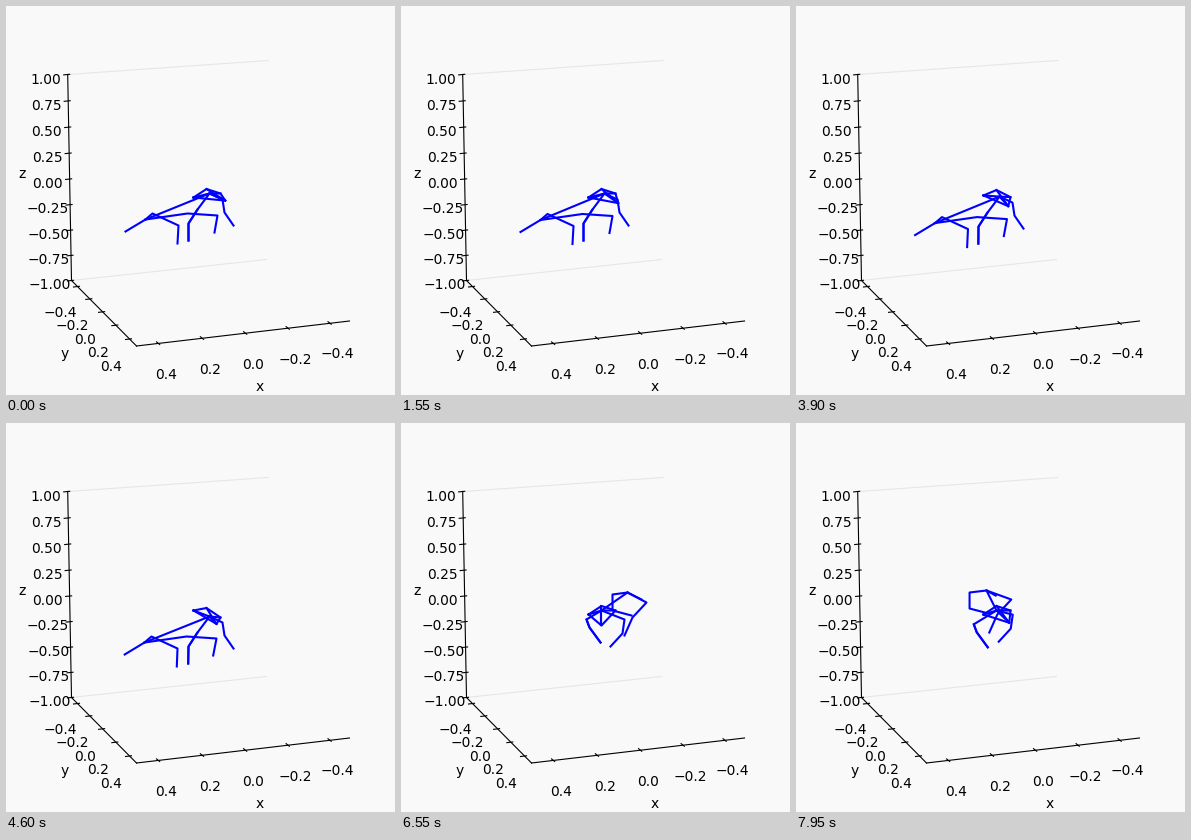
Animation, 389 px wide and 389 px high, one loop 8000 ms. Source, as a matplotlib script:

```python
import numpy as np
import matplotlib.pyplot as plt
from matplotlib.animation import FuncAnimation

SIZE, STEP, LOOP = 389, 50, 8000
WALK_END, TURN, AWAY = 5100, 5750, 6550

# Limbs as joint offsets: walking pose, turned-away pose, then how the limb
# spreads in the turn (first joint, extra per joint) and drifts at the end.
REAR = {
    "a": ([(-9, 16), (-18, 30), (-18, 47)], [(-15, 9), (-12, 17), (-1, 32)],
          (0, 0), (-3, 4), (-8, 5)),
    "b": ([(16, 6), (18, 19), (27, 32)], [(23, 9), (21, 23), (9, 36)],
          (0, -2), (13, 0), (-7, -5)),
}
FRONT = {
    "c": ([(7, -6), (33, 6), (32, 24)], [(19, 10), (5, 25), (-3, 43)],
          (3, 3), (12, -5), (6, -1)),
    "d": ([(42, -6), (72, -4), (69, 13)], [(-15, 2), (-15, 18), (4, 23)],
          (-25, -1), (-5, -1), (-2, 0)),
    "tip": ([(-20, 12)], [(14, 7)], (-2, 0), (0, 0), (-5, -2)),
}
STRIDE = {"a": 1.5, "c": -1.5, "d": 1.5, "tip": -1}

CHAINS = [c.split() for c in (
    "left top right low left", "left root right", "top low", "root low",
    "root chest tip0", "chest c0 c1 c2", "chest d0 d1 d2",
    "root a0 a1 a2", "a0 splay a2", "root b0 b1 b2")]


def ramp(t, start, end):
    return np.clip((t - start) / (end - start), 0, 1)


def ease(t, start, end):
    return 0.5 - 0.5 * np.cos(np.pi * ramp(t, start, end))


def chest_at(t):
    """Steady walk, swing out to the right, then drift back behind the hips."""
    times = [0, 3150, 4600, WALK_END, TURN, 6150, AWAY, 7200, 7950]
    x = [139, 139, 138, 138, 213, 255, 226, 208, 190]
    y = [213, 214, 219, 219, 186, 179, 169, 164, 167]
    return np.array([np.interp(t, times, x), np.interp(t, times, y)])


def pose(t):
    turned = ease(t, WALK_END, TURN)
    wide = np.sin(np.pi * ramp(t, WALK_END, 2 * TURN - WALK_END)) ** 2
    late = ramp(t, AWAY, LOOP)
    sink = ramp(t, 3150, 4600) - turned
    gait = np.sin(2 * np.pi * t / 1550) * (1 - turned)

    chest = chest_at(t)
    hips = np.array([200, 187 + 6 * sink])
    spin = np.radians(np.interp(t, [0, 4600, TURN, AWAY, LOOP], [20, 60, 117, 90, 49]))
    p = {"chest": chest,
         "root": hips + [3 * (1 - turned), 0],
         "left": np.array([187, 191 - 4 * sink]),
         "top": np.array([200, 182.5 + 2 * sink]),
         "right": np.array([214, 187 + 7 * sink]),
         "low": np.array([200 + 20 * np.cos(spin), 190 + 12 * np.sin(spin)])}

    for origin, limbs in ((hips, REAR), (chest, FRONT)):
        for name, (walk, away, base, step, drift) in limbs.items():
            n = np.arange(len(walk))[:, None]
            joints = (origin + (1 - turned) * np.array(walk) + turned * np.array(away)
                      + wide * (np.array(base) + n * np.array(step))
                      + late * np.array(drift))
            joints[-1, 0] += STRIDE.get(name, 0) * gait
            p.update({f"{name}{k}": joint for k, joint in enumerate(joints)})
    p["splay"] = p["a1"] + wide * np.array([11, -1])
    return p


fig = plt.figure(figsize=(SIZE / 100, SIZE / 100), dpi=100, facecolor="#f9f9f9")
ax = fig.add_axes([0, 0, 1, 1])
ax.set_xlim(-0.5, SIZE - 0.5)
ax.set_ylim(SIZE - 0.5, -0.5)
ax.axis("off")


def segment(a, b, color="black"):
    ax.plot([a[0], b[0]], [a[1], b[1]], color=color, lw=0.8)


def label(x, y, text):
    ax.text(x, y, text, fontsize=10, family="DejaVu Sans", ha="center", va="baseline")


def scale(values, fmt, ticks, texts, stub, bow):
    """Ticks and labels between two end positions; bow adds the perspective."""
    (t0, t1), (l0, l1), (back, ahead) = np.array([ticks, texts, stub], float)
    for u, v in zip(np.linspace(0, 1, len(values)), values):
        u += bow * u * (1 - u)
        tick = t0 + u * (t1 - t0)
        segment(tick + back, tick + ahead)
        label(*(l0 + u * (l1 - l0)), format(v, fmt).replace("-", "\u2212"))


segment((61.5, 68), (261.5, 54), "#e6e6e6")
segment((65, 274), (260, 253), "#e6e6e6")
segment((61.2, 68), (65, 274))
segment((65, 274), (130, 339.5))
segment((130, 339.5), (343, 314.5))

scale(np.linspace(1, -1, 9), ".2f", ((61.2, 68), (65, 274)),
      ((39, 77.3), (43, 282.5)), ((-4, 0.4), (2, -0.2)), 0.03)
scale(np.linspace(0.4, -0.4, 5), ".1f", ((152, 337), (323.5, 316.8)),
      ((160, 373), (331, 352)), ((-2, -1.6), (1.2, 1)), 0.03)
scale(np.linspace(-0.4, 0.4, 5), ".1f", ((71, 280), (123, 332.5)),
      ((54, 311), (105, 365)), ((-4, 0.5), (2, -0.2)), -0.07)
label(15.5, 171.5, "z")
label(58.3, 352, "y")
label(253.5, 384.6, "x")

bones = [ax.plot([], [], color="blue", lw=1.5)[0] for _ in CHAINS]


def update(i):
    joints = pose(i * STEP)
    for line, chain in zip(bones, CHAINS):
        line.set_data(*np.array([joints[name] for name in chain]).T)
    return bones


anim = FuncAnimation(fig, update, frames=LOOP // STEP, interval=STEP,
                     repeat=True, repeat_delay=0)
plt.show()
```
